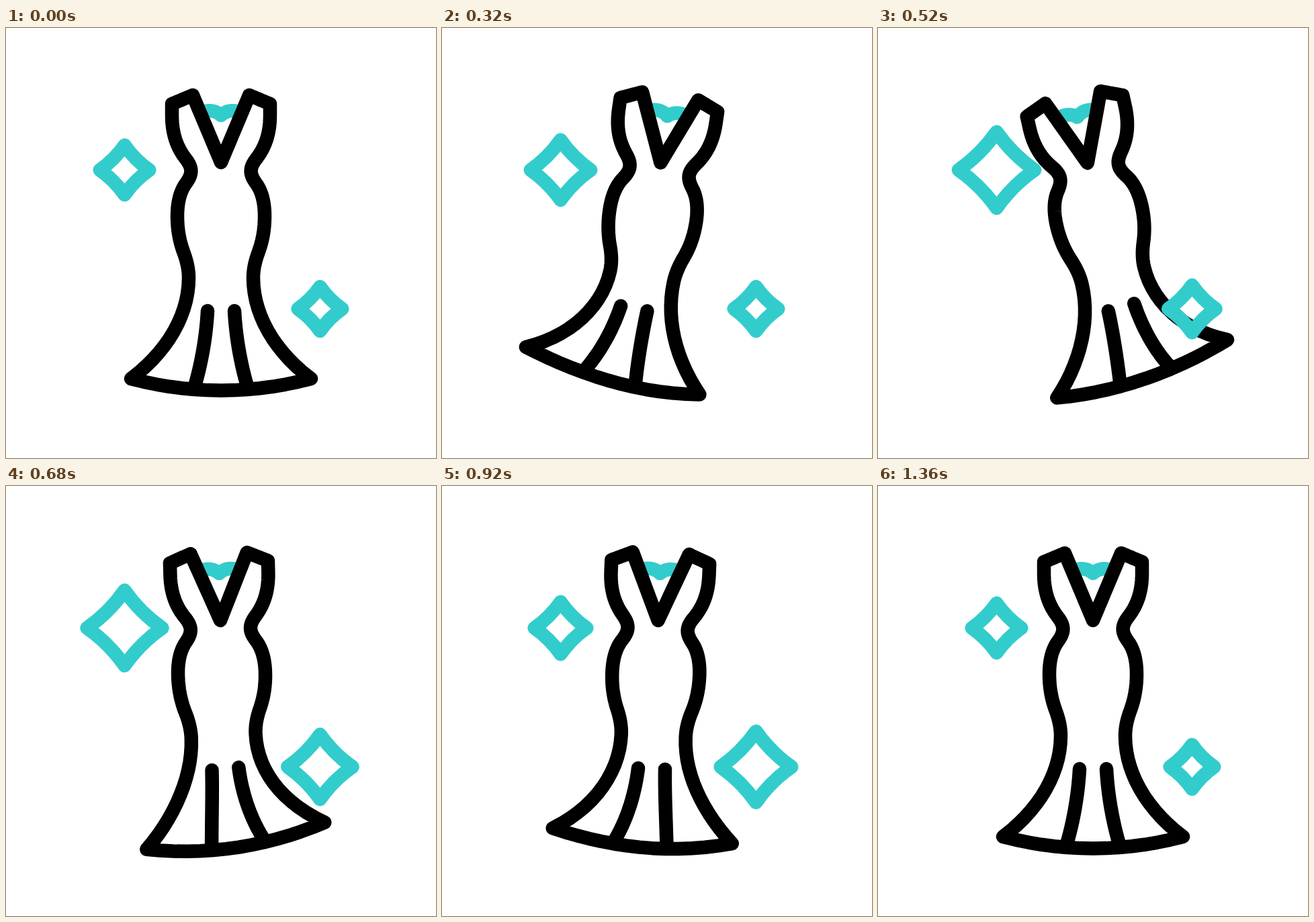
Write an HTML page that moves like this. It is 640x640 px and loops after 1600 ms.

```html
<!DOCTYPE html>
<html lang="en">
<head>
<meta charset="utf-8">
<title>Swaying dress</title>
<style>
  html, body { margin: 0; width: 100%; height: 100%; overflow: hidden; background: #fff; }
  svg { display: block; width: 100vw; height: 100vh; }
  path { fill: none; stroke-width: 20.5; stroke-linecap: round; stroke-linejoin: round; }
  .ink { stroke: #000; }
  .teal { stroke: #33cccc; }
</style>
</head>
<body>
<svg viewBox="0 0 640 640">
  <path id="neck" class="teal"/>
  <path id="pleatL" class="ink"/>
  <path id="pleatR" class="ink"/>
  <path id="body" class="ink"/>
  <path id="starA" class="teal"/>
  <path id="starB" class="teal"/>
</svg>
<script>
const LOOP = 1600, STEP = 40;
const CX = 320, PIVOT = 238, REACH = 284;
const RAD = Math.PI / 180;
const el = id => document.getElementById(id);

// Sway angles in degrees: upper part, then lean and tilt at the knee and hem
const TIMES = [40, 160, 240, 320, 400, 520, 560, 600, 680, 800, 920, 1080, 1160, 1280];
const SWAY = {
  top:      [0, 6, 12, 8.2, -1, -12.5, -13.3, -12.2, -1.4, 6, 2.4, 0, 0, 0],
  kneeLean: [0, 5, 12.3, 10.8, 1, -13.3, -14.4, -13.3, -2, 5.8, 2.5, 0, 0, 0],
  kneeTilt: [0, 4.5, 12.5, 11, 1, -16, -17.5, -17, -5.8, 6, 2.5, 0, 0, 0],
  hemLean:  [0, 4, 13.8, 13.6, 4, -15.2, -16.5, -15.7, -4.4, 6.5, 4.4, -0.6, -0.4, 0],
  hemTilt:  [0, 2.5, 14.5, 15.3, 6, -18.8, -20.5, -20, -8.6, 6.5, 4.9, 0, 0, 0]
};

// Smooth curve through keys, flat at every peak
function curve(keys, t) {
  const last = TIMES.length - 1;
  if (t <= TIMES[0]) return keys[0];
  if (t >= TIMES[last]) return keys[last];
  const slope = i => (keys[i + 1] - keys[i]) / (TIMES[i + 1] - TIMES[i]);
  const tangent = i => {
    if (i === 0 || i === last) return 0;
    const a = slope(i - 1), b = slope(i);
    return a * b > 0 ? 2 * a * b / (a + b) : 0;
  };
  let i = 0;
  while (TIMES[i + 1] < t) i++;
  const w = TIMES[i + 1] - TIMES[i], s = (t - TIMES[i]) / w;
  const s2 = s * s, s3 = s2 * s;
  return keys[i] * (2 * s3 - 3 * s2 + 1) + keys[i + 1] * (3 * s2 - 2 * s3)
       + w * (tangent(i) * (s3 - 2 * s2 + s) + tangent(i + 1) * (s3 - s2));
}

// Sample cubic segments given as [x1, y1, x2, y2, x, y]; straight lines as [x, y]
function trace(start, segs) {
  const pts = [start];
  for (const c of segs) {
    const [px, py] = pts[pts.length - 1];
    const [a, b, d, e, x, y] = c.length === 6 ? c
      : [px + (c[0] - px) / 3, py + (c[1] - py) / 3, px + (c[0] - px) * 2 / 3, py + (c[1] - py) * 2 / 3, ...c];
    for (let i = 1; i <= 14; i++) {
      const s = i / 14, r = 1 - s;
      const mix = (p, q, u, v) => r * r * r * p + 3 * r * r * s * q + 3 * r * s * s * u + s * s * s * v;
      pts.push([mix(px, a, d, x), mix(py, b, e, y)]);
    }
  }
  return pts;
}
const mirror = pts => pts.map(([x, y]) => [2 * CX - x, y]);

const side = trace([CX, 200], [
  [278, 100], [247, 113], [247, 130],
  [247, 157, 254, 177, 267, 194],
  [278, 208, 278, 217, 268, 231],
  [259, 243, 255, 260, 255, 280],
  [255, 302, 259, 319, 264, 333],
  [269, 346, 272, 359, 272, 372],
  [272, 425, 242, 480, 186, 522]
]);
const hem = trace([186, 522], [[275.3, 545.3, 364.7, 545.3, 454, 522]]);
const body = [...side, ...hem, ...mirror(side).reverse()];
const pleat = trace([300, 421], [[298, 458, 291.5, 496, 281.5, 531]]);
const neckHalf = trace([290, 126], [[302, 121.3, 312, 122.7, 320, 130]]);
const neck = [...neckHalf, ...mirror(neckHalf).reverse()];

function bender(t) {
  const v = {};
  for (const k in SWAY) v[k] = curve(SWAY[k], t);
  const spread = (knee, end, u) => {
    const k = knee - v.top, h = end - v.top;
    const a = (k - 0.267 * h) / 0.148;
    return (v.top + a * u * u + (h - a) * u * u * u) * RAD;
  };
  return ([x, y]) => {
    const u = Math.max(0, (y - PIVOT) / REACH);
    const lean = spread(v.kneeLean, v.hemLean, u);
    const tilt = spread(v.kneeTilt, v.hemTilt, u);
    const r = (y - PIVOT) * (1 - 0.25 * u ** 4 * lean * lean);
    return [CX - r * Math.sin(lean) + (x - CX) * Math.cos(tilt),
            PIVOT + r * Math.cos(lean) + (x - CX) * Math.sin(tilt)];
  };
}

const draw = (id, pts, end = "") =>
  el(id).setAttribute("d", "M" + pts.map(p => p.map(n => n.toFixed(2)).join(" ")).join("L") + end);

function star(id, x, y, r) {
  const c = 0.41 * r;
  el(id).setAttribute("d",
    `M${x} ${y - r}Q${x + c} ${y - c} ${x + r} ${y}Q${x + c} ${y + c} ${x} ${y + r}` +
    `Q${x - c} ${y + c} ${x - r} ${y}Q${x - c} ${y - c} ${x} ${y - r}Z`);
}

const ease = (t, a, b) => (1 - Math.cos(Math.PI * Math.min(1, Math.max(0, (t - a) / (b - a))))) / 2;
const pulse = (t, a, b, c, d) => ease(t, a, b) - ease(t, c, d);

function render(t) {
  const bend = bender(t);
  draw("neck", neck.map(bend));
  draw("pleatL", pleat.map(bend));
  draw("pleatR", mirror(pleat).map(bend));
  draw("body", body.map(bend), "Z");
  star("starA", 176.5, 211.3, 36.8 + 21.2 * pulse(t, 120, 600, 600, 1000));
  star("starB", 467.4, 418, 32.8 + 21.2 * pulse(t, 440, 810, 840, 1360));
}

const begin = performance.now();
function tick() {
  const t = (performance.now() - begin) % LOOP;
  render(Math.floor(t / STEP) * STEP);
  requestAnimationFrame(tick);
}
tick();
</script>
</body>
</html>
```
